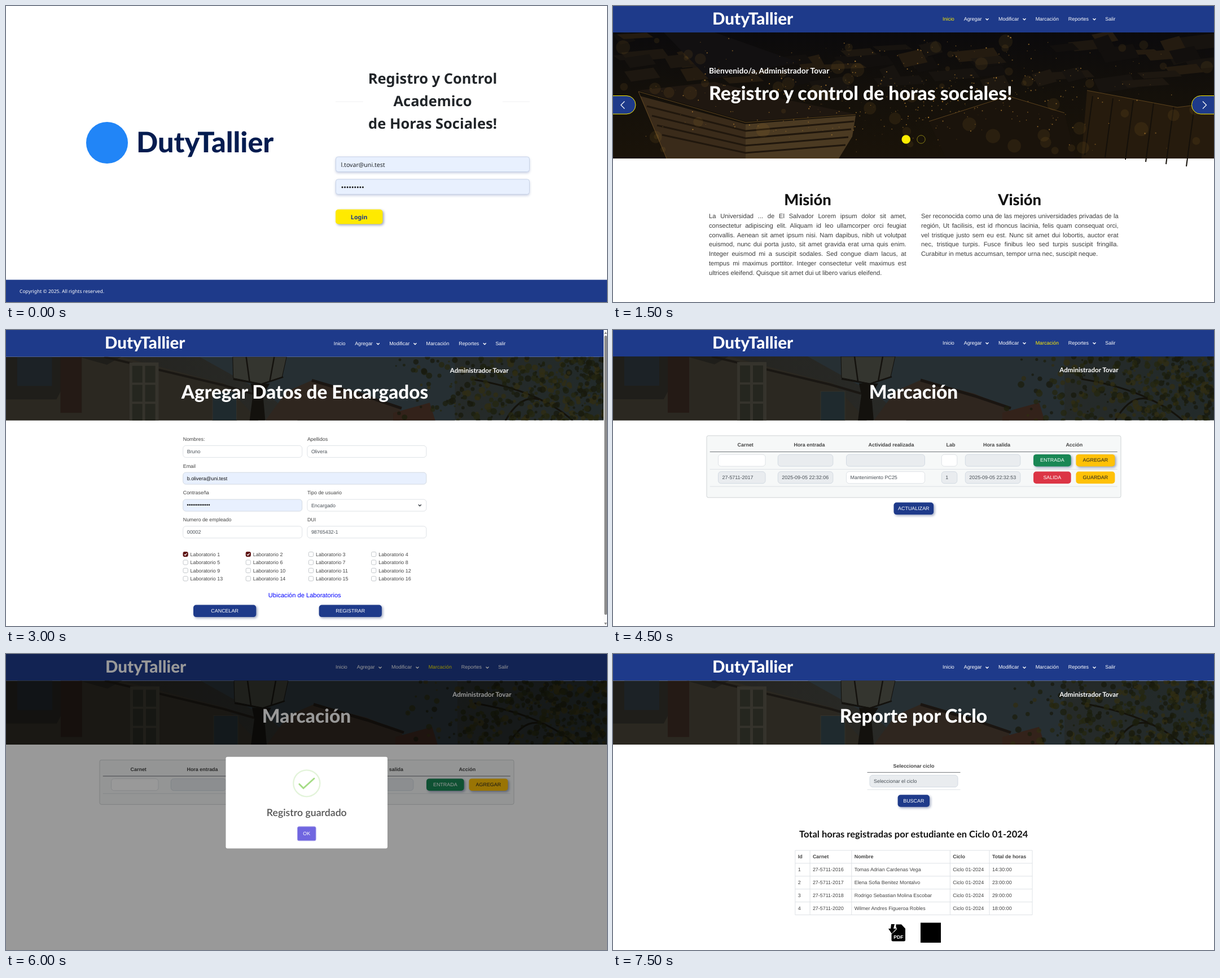
Write an HTML page that moves like this. It is 1065x526 px and loops after 8 s.

```html
<!DOCTYPE html>
<html lang="es">
<head>
<meta charset="utf-8">
<title>DutyTallier</title>
<style>
  html, body { margin: 0; width: 100%; height: 100%; overflow: hidden; background: #fff; }
  svg { display: block; }
  #stage { width: 100%; height: 100%; font-family: "Liberation Sans", Arial, sans-serif; text-rendering: geometricPrecision; }
  .m { text-anchor: middle; }
  .e { text-anchor: end; }
  .b { font-weight: 700; }
  .h { font-family: Lato, sans-serif; font-weight: 800; }
  .l { font-family: Lato, sans-serif; font-weight: 700; }
  .s { font-family: Lato, sans-serif; font-weight: 600; }
  .o { font-family: "Noto Sans", "Open Sans", sans-serif; }
  .drop { filter: drop-shadow(2px 2px 2px rgba(30, 50, 110, .45)); }
  .soft { filter: drop-shadow(0 2px 2px rgba(30, 58, 138, .25)); }
  p { margin: 0; font-size: 11.17px; line-height: 16.77px; color: #3c3c3c; text-align: justify; }
</style>
</head>
<body>
<svg id="stage" viewBox="0 0 1065 526"></svg>
<script>
const BLUE = '#1e3a8a', YELLOW = '#ffee00', GREY = '#e9ecef', PALE = '#e8f0fe', LINE = '#dee2e6', INK = '#444';

let seed = 11;
const rnd = () => (seed = seed * 16807 % 2147483647) / 2147483647;
const repeat = (n, fn) => Array.from({ length: n }, (_, i) => fn(i)).join('');

const text = (x, y, s, size = 8.93, cls = '', fill = INK) =>
  `<text x="${x}" y="${y}" font-size="${size}" class="${cls}" fill="${fill}">${s}</text>`;
const box = (x, y, w, h, fill, stroke = 'none', r = 0, cls = '') =>
  `<rect x="${x}" y="${y}" width="${w}" height="${h}" rx="${r}" fill="${fill}" stroke="${stroke}" class="${cls}"/>`;
const poly = (points, fill, stroke = 'none') => `<polygon points="${points}" fill="${fill}" stroke="${stroke}"/>`;
const dot = (x, y, r, fill, more = '') => `<circle cx="${x}" cy="${y}" r="${r}" fill="${fill}" ${more}/>`;
const path = (d, stroke, width = 1, more = '') =>
  `<path d="${d}" fill="none" stroke="${stroke}" stroke-width="${width}" ${more}/>`;
const chevron = (x, y, color) => path(`M${x - 2.5} ${y - 1.3}l2.5 2.5l2.5-2.5`, color, 1.4);
const field = (x, y, w, s = '', fill = '#fff', color = '#495057') =>
  box(x, y, w, 21, fill, fill === '#fff' ? LINE : '#d3dae2', 5) + text(x + 7, y + 13.6, s, 8.93, '', color);
const button = (x, y, w, s, fill = BLUE, color = '#fff', cls = 'drop') =>
  box(x, y, w, 21.5, fill, 'none', 5, cls) + text(x + w / 2, y + 13.5, s, 8.93, 'm', color);
const bullets = (x, y, n, step, r) => repeat(n, i => dot(x + i * step, y, r, '#111'));
const paragraph = (x, s) => `<foreignObject x="${x}" y="366.2" width="349.6" height="130"><p>${s}</p></foreignObject>`;

function header(active) {
  const items = [['Inicio', 584], ['Agregar', 621.7, 663], ['Modificar', 683, 729],
    ['Marcación', 748.7], ['Reportes', 806.8, 853], ['Salir', 872.3]];
  return box(0, -2, 1065, 49, BLUE) + text(176, 32.5, 'DutyTallier', 29.6, 'h', '#fff') +
    items.map(([s, x, arrow]) => text(x, 25.8, s, 8.93, '', s === active ? YELLOW : '#fff') +
      (arrow ? chevron(arrow, 23.6, '#fff') : '')).join('');
}

function nightCity() {
  const roofs = ['#1d1710', '#120f0d', '#241b10', '#17130f'];
  const house = () => {
    const x = rnd() * 1065, y = 50 + rnd() * 85, w = 25 + rnd() * 55, h = 8 + rnd() * 16;
    return poly(`${x},${y} ${x + w},${y - h * .4} ${x + w + 12},${y + h * .6} ${x + 12},${y + h}`, roofs[rnd() * 4 | 0]);
  };
  const light = (x, y, r, opacity) => dot(x, y, r, '#d79a3c', `opacity="${opacity}"`);
  return box(0, 47, 1065, 224, 'url(#night)') + repeat(60, house) +
    poly('90,47 180,47 330,100 170,130', '#121011') +
    poly('560,205 700,160 800,190 820,271 590,271', '#1a130b') +
    poly('840,150 1000,180 1065,172 1065,271 830,271', '#261b0d') +
    repeat(6, i => path(`M${850 + i * 36} ${160 + i * 4}l-14 105`, '#15100a', 2)) +
    poly('45,150 235,205 430,192 300,165 180,135', '#1f1710') +
    poly('48,160 235,210 235,271 95,271', '#3a2b1a') +
    poly('235,210 430,195 424,232 400,271 235,271', '#4b3a22') +
    repeat(4, i => path(`M${60 + i * 9} ${178 + i * 17}L235 ${222 + i * 13}L${427 - i * 5} ${205 + i * 14}`, '#20170d', 3)) +
    path('M45 152L235 207L430 193M45 152L95 271M560 205L700 160L800 190M840 150L1000 180L1065 172', '#7a5726', 1, 'opacity=".7"') +
    repeat(60, () => light(rnd() * 1065, 60 + rnd() * 200, 4 + rnd() * 9, .09)) +
    repeat(420, () => light(540 + (rnd() + rnd() - 1) * 540, 50 + (rnd() + rnd()) * 105, .4 + rnd() * .8, .25 + rnd() * .5));
}

function courtyard() {
  const leaves = ['#1b1e0d', '#24260f', '#302c12', '#17190d'];
  return box(0, 0, 1065, 114, 'url(#day)') +
    poly('345,0 800,0 800,114 520,114 470,70', '#262f33') +
    poly('130,0 205,0 390,48 450,114 0,114 0,70', '#2b2821') +
    poly('0,0 205,0 180,14 130,0 90,76 0,76', '#1f1e1a') +
    path('M175 0L385 50L440 66', '#1a1713', 4) +
    box(20, 0, 62, 52, '#1c2226') + box(97, 0, 38, 100, '#241a15') +
    box(220, 10, 52, 104, '#35332c') +
    repeat(6, i => box(225 + i % 2 * 23, 16 + (i >> 1) * 34, 18, 30, '#25261f')) +
    box(368, 62, 43, 52, '#1f2a2e', '#35322b') +
    poly('462,114 500,62 545,42 640,66 702,92 702,114', '#2f261f') +
    path('M545 42L640 70L705 92', '#1a1511', 5) +
    poly('690,100 755,82 765,114 690,114', '#33221a') +
    poly('404,0 500,0 492,36 455,48 405,38', '#34352f', '#12100c') +
    path('M405 40L455 49L494 36M428 0L434 44M478 0L470 44', '#14120e', 2.5) +
    poly('436,48 470,48 458,68 462,114 434,114 440,68', '#13110d') +
    path('M1010 114Q950 60 830 40M960 80Q920 60 890 114', '#14120b', 3) +
    repeat(420, () => {
      const x = 690 + 375 * Math.sqrt(rnd()), y = rnd() * 114;
      return dot(x, y, 1.5 + rnd() * 4.5, leaves[rnd() * 4 | 0], 'opacity=".75"');
    });
}

const banner = (title, active) => header(active) +
  `<svg x="0" y="47" width="1065" height="113.5">${courtyard()}</svg>` +
  text(895.5, 75, 'Administrador Tovar', 11.6, 'l e', '#fff') +
  text(532.5, 121.5, title, 33.5, 'h m', '#fff');

function login() {
  const title = ['Registro y Control', 'Academico', 'de Horas Sociales!'];
  return dot(179, 243, 37, '#2185f7') +
    text(231, 260, 'DutyTallier', 50.3, 'h', '#041c50') +
    title.map((s, i) => text(756, 137.8 + i * 40.2, s, 25.5, 'o b m', '#212529')).join('') +
    box(584, 169.5, 49, 1, '#f1f2f3') + box(880, 169.5, 48, 1, '#f1f2f3') +
    box(584.5, 268, 343, 26.5, PALE, '#c8d3e8', 4, 'soft') + text(593.5, 285.5, 'l.tovar@uni.test', 10.6, 'o', '#212529') +
    box(584.5, 308, 343, 26.5, PALE, '#c8d3e8', 4, 'soft') + bullets(596, 322, 9, 4.55, 1.5) +
    box(584, 361.5, 83.5, 26, '#ffea00', 'none', 5, 'drop') + text(625.7, 378.8, 'Login', 10.7, 'o b m', BLUE) +
    box(0, 486.5, 1065, 40, BLUE) + text(24, 509.8, 'Copyright © 2025. All rights reserved.', 8.55, 'o', '#fff');
}

function home() {
  return nightCity() + header('Inicio') +
    text(170, 120, 'Bienvenido/a, Administrador Tovar', 13.9, 'l', '#fff') +
    text(170, 166.5, 'Registro y control de horas sociales!', 33.75, 'h', '#fff') +
    box(-30, 159.5, 70, 32.5, BLUE, YELLOW, 16) + path('M20.5 169.5l-6.5 6.5l6.5 6.5', '#fff', 1.2) +
    box(1025.5, 159.5, 70, 32.5, BLUE, YELLOW, 16) + path('M1045 169.5l6.5 6.5l-6.5 6.5', '#fff', 1.2) +
    dot(519.3, 237, 7.8, YELLOW) + dot(546, 237, 7.2, 'none', 'stroke="#857c14"') +
    text(345, 354, 'Misión', 27.3, 'h m', '#111') + text(720.7, 354, 'Visión', 27.3, 'h m', '#111') +
    paragraph(170, 'La Universidad ... de El Salvador Lorem ipsum dolor sit amet, consectetur adipiscing elit. Aliquam id leo ullamcorper orci feugiat convallis. Aenean sit amet ipsum nisi. Nam dapibus, nibh ut volutpat euismod, nunc dui porta justo, sit amet gravida erat urna quis enim. Integer euismod mi a suscipit sodales. Sed congue diam lacus, at tempus mi maximus porttitor. Integer consectetur velit maximus est ultrices eleifend. Quisque sit amet dui ut libero varius eleifend.') +
    paragraph(546, 'Ser reconocida como una de las mejores universidades privadas de la región, Ut facilisis, est id rhoncus lacinia, felis quam consequat orci, vel tristique justo sem eu est. Nunc sit amet dui lobortis, auctor erat nec, tristique turpis. Fusce finibus leo sed turpis suscipit fringilla. Curabitur in metus accumsan, tempor urna nec, suscipit neque.');
}

function form() {
  const left = 313.7, right = 533.9, w = 211;
  const labels = [['Nombres:', 'Apellidos'], ['Email', ''], ['Contraseña', 'Tipo de usuario'], ['Numero de empleado', 'DUI']];
  const check = i => {
    const x = 314 + i % 4 * 111.2, y = 394.4 + (i >> 2) * 14.45, on = i < 2;
    return box(x, y, 8.2, 8.2, on ? '#5c1010' : '#fff', on ? '#5c1010' : '#c3c7cb', 2) +
      (on ? path(`M${x + 1.8} ${y + 4.2}l1.7 1.7l3-3.4`, '#fff', 1.3) : '') +
      text(x + 12.6, y + 7.3, 'Laboratorio ' + (i + 1));
  };
  return `<g transform="translate(0 1) scale(.9944)">${banner('Agregar Datos de Encargados')}</g>` +
    labels.map(([a, b], i) => text(left, 196.8 + i * 47.8, a) + text(right, 196.8 + i * 47.8, b)).join('') +
    field(left, 205.4, w, 'Bruno') + field(right, 205.4, w, 'Olivera') +
    field(left, 253.1, 431.2, 'b.olivera@uni.test', PALE, '#111') +
    field(left, 301, w, '', PALE) + bullets(322, 310.8, 13, 3.17, 1.25) +
    field(right, 301, w, 'Encargado') + chevron(733.3, 311.5, '#343a40') +
    field(left, 348.7, w, '00002') + field(right, 348.7, w, '98765432-1') +
    repeat(16, check) +
    text(529.2, 475.4, 'Ubicación de Laboratorios', 11.1, 'm', '#00f') +
    button(332, 488.6, 111.3, 'CANCELAR') + button(554.6, 488.6, 111.3, 'REGISTRAR') +
    box(1059, 0, 6, 526, '#fbfbfb') + box(1060.3, 10, 4.7, 496, '#8b8b8b', 'none', 2) +
    poly('1060,7 1062.5,3 1065,7', '#8b8b8b') + poly('1060,520 1062.5,524 1065,520', '#8b8b8b');
}

function clocking(rows) {
  const cols = [[186.5, 83.5, 'Carnet', 234.7], [292.3, 97.5, 'Hora entrada', 348], [413.5, 139, 'Actividad realizada', 493],
    [582.3, 27.5, 'Lab', 598.5], [624.3, 97.5, 'Hora salida', 680]];
  const values = ['27-5711-2017', '2025-09-05 22:32:06', 'Mantenimiento PC25', '1', '2025-09-05 22:32:53'];
  const fields = (y, open, data = []) =>
    cols.map(([x, w], i) => field(x, y, w, data[i], open.includes(i) ? '#fff' : GREY)).join('');
  return banner('Marcación', 'Marcación') +
    box(166, 187.8, 734, rows > 1 ? 110 : 79, '#f6f8f8', '#d0d4d6', 3) +
    cols.map(c => text(c[3], 207.4, c[2], 8.93, 'b m')).join('') + text(817.3, 207.4, 'Acción', 8.93, 'b m') +
    box(171.7, 216, 722, 1, '#73777b') + box(171.7, 247, 722, 1, LINE) +
    fields(221.2, [0, 3]) + button(745, 220.9, 66.6, 'ENTRADA', '#198754') + button(820.4, 220.9, 69, 'AGREGAR', '#ffc107', '#222') +
    (rows > 1 ? fields(251.7, [2], values) + box(171.7, 277.5, 722, 1, LINE) +
      button(745, 251.5, 66.6, 'SALIDA', '#dc3545', '#fff', '') + button(820.4, 251.5, 69, 'GUARDAR', '#ffc107', '#222', '') +
      button(497.5, 306.6, 70.6, 'ACTUALIZAR') : '');
}

function saved() {
  return `<g transform="translate(0 .5)">${clocking(1)}</g>` + box(0, 0, 1065, 526, 'rgba(0,0,0,.4)') +
    box(389.5, 182.8, 286.5, 162.8, '#fff', 'none', 3) +
    dot(532.8, 229.8, 23.5, 'none', 'stroke="#e3f4da" stroke-width="2.3"') +
    path('M519.8 231.3l7.2 7.2l19-17.3', '#a5dc86', 2.9, 'stroke-linecap="round"') +
    text(532.8, 288.2, 'Registro guardado', 17.7, 's m', '#545454') +
    box(516.5, 306.8, 32.6, 25, '#7066e0', '#a29be9', 2.5) + text(532.8, 322, 'OK', 8.93, 'm', '#fff');
}

function report() {
  const xs = [322.8, 349, 422.8, 597.3, 667, 743];
  const rows = [['Id', 'Carnet', 'Nombre', 'Ciclo', 'Total de horas'],
    ['1', '27-5711-2016', 'Tomas Adrian Cardenas Vega', 'Ciclo 01-2024', '14:30:00'],
    ['2', '27-5711-2017', 'Elena Sofia Benitez Montalvo', 'Ciclo 01-2024', '23:00:00'],
    ['3', '27-5711-2018', 'Rodrigo Sebastian Molina Escobar', 'Ciclo 01-2024', '29:00:00'],
    ['4', '27-5711-2020', 'Wilmer Andres Figueroa Robles', 'Ciclo 01-2024', '18:00:00']];
  return `<g transform="translate(0 .5)">${banner('Reporte por Ciclo')}</g>` +
    text(533, 201.6, 'Seleccionar ciclo', 8.93, 'b m') +
    box(450.5, 209.9, 165, 1, '#73777b') + box(450.5, 240.5, 165, 1, LINE) +
    field(455, 215.4, 156, 'Seleccionar el ciclo', GREY) + button(504.6, 250.3, 56.4, 'BUSCAR') +
    text(532.7, 326.2, 'Total horas registradas por estudiante en Ciclo 01-2024', 16.5, 'l m', '#111') +
    xs.map(x => path(`M${x} 349V463.6`, LINE)).join('') +
    repeat(6, i => path(`M322.8 ${349 + i * 22.92}H743`, LINE)) +
    rows.map((row, r) => row.map((s, c) => text(xs[c] + 4.9, 363.4 + r * 22.92, s, 8.93, r ? '' : 'b')).join('')).join('') +
    '<path d="M500 480.5H511L518 488V508Q518 510.5 515.5 510.5H496Q493.5 510.5 493.5 508V498L503 489Z"/>' +
    path('M499 480L496 493', '#fff', 6) + poly('493,480 499,480 497,488 502,488 494,497 488,488 492,488', '#000') +
    text(505.8, 505.5, 'PDF', 8.6, 'b m', '#fff') +
    box(545, 477.5, 36, 35.5, '#000');
}

const stop = (at, color) => `<stop offset="${at}" stop-color="${color}"/>`;
const scenes = [login(), home(), form(), clocking(2), saved(), report()];
const stage = document.getElementById('stage');
stage.innerHTML = `<defs>
  <linearGradient id="night" x2="0" y2="1">${stop(0, '#0b0a0c')}${stop(.5, '#14100a')}${stop(1, '#1a1309')}</linearGradient>
  <linearGradient id="day">${stop(0, '#22211d')}${stop(.5, '#292a27')}${stop(1, '#222a2a')}</linearGradient>
  </defs>` + scenes.map(s => `<g class="scene">${s}</g>`).join('');

const groups = [...stage.querySelectorAll('.scene')];
const LOOP = 8000, HOLD = 1500;
function draw(now) {
  const current = Math.floor(now % LOOP / HOLD);
  groups.forEach((g, i) => g.style.display = i === current ? '' : 'none');
}
const start = performance.now();
function tick() {
  draw(performance.now() - start);
  requestAnimationFrame(tick);
}
tick();
</script>
</body>
</html>
```
